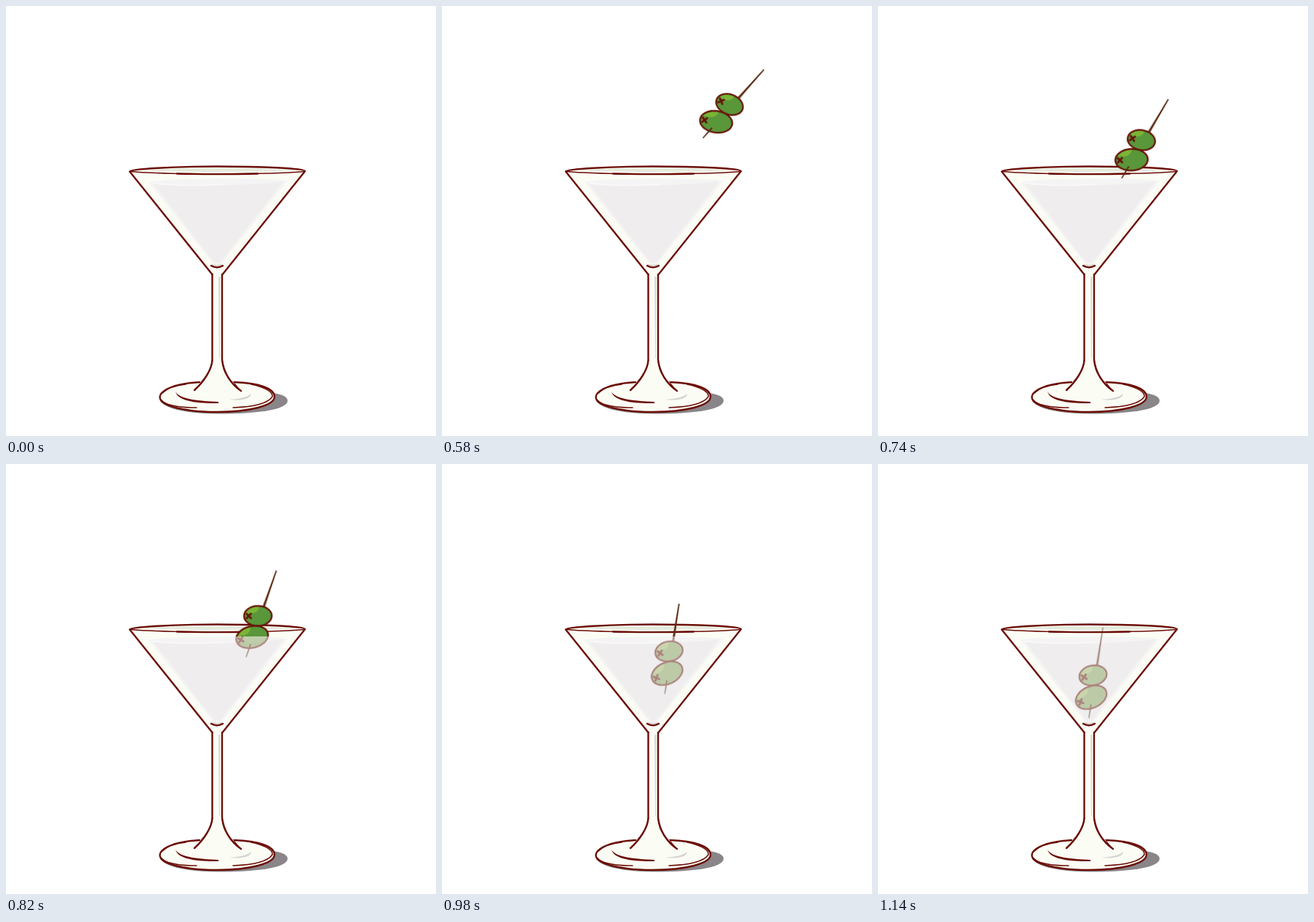
Write an HTML page that moves like this. It is 591x591 px and loops after 1.7 s.

```html
<!DOCTYPE html>
<html lang="en">
<head>
<meta charset="utf-8">
<title>Olives dropping into a martini</title>
<style>
  html, body { margin: 0; width: 100%; height: 100%; overflow: hidden; background: #fff; }
  svg { display: block; width: 100%; height: 100%; }
  .line { fill: none; stroke: #6b0d06; stroke-width: 2.4; stroke-linecap: round; stroke-linejoin: round; }
  .thin { stroke-width: 1.5; }
  .ink { fill: #6b0d06; }
  .ivory { fill: #fbfdf5; }
  .skin { fill: var(--skin); }
  .shine { fill: var(--shine); }
  .rind { fill: none; stroke: #651408; stroke-width: 2.2; }
  .stick { fill: #5c2a12; }

  .pick { animation: drop 1.7s step-end infinite; }
  .dry { --skin: #5a963a; --shine: #79b536; animation: sink 1.7s step-end infinite; }
  .wet { --skin: #89a661; --shine: #a3be6c; opacity: .5; }

  @keyframes drop {
    0%      { transform: translate(-300px, -300px); }
    29.411% { transform: translate(418.5px, 110.5px) rotate(41.7deg); }
    34.117% { transform: translate(400.5px, 134.5px) rotate(41.7deg); }
    38.823% { transform: translate(382.7px, 159px) rotate(41.7deg); }
    43.529% { transform: translate(367px, 182.5px) rotate(30.5deg); }
    48.235% { transform: translate(350.8px, 206px) rotate(19.3deg); }
    52.941% { transform: translate(332.4px, 228.3px) rotate(19.3deg); }
    57.647% { transform: translate(316px, 254px) rotate(9deg); }
    62.352% { transform: translate(307.8px, 270.5px) rotate(9deg); }
    67.058%, 100% { transform: translate(299.5px, 287px) rotate(8.8deg); }
  }
  /* Once fully under, the whole pick is seen through the glass. */
  @keyframes sink {
    0% { opacity: 1; }
    67.058%, 100% { opacity: 0; }
  }
</style>
</head>
<body>
<svg viewBox="0 0 591 591">
  <defs>
    <clipPath id="above"><rect width="591" height="237"/></clipPath>
    <path id="pimento" d="M-3-3 3 3M-3 3 3-3" stroke="#651408" stroke-width="2.8" stroke-linecap="round"/>
    <g id="olives">
      <path class="stick" d="M-.7-63H.7L1.5-5H-1.5Z"/>
      <g transform="translate(-3.4 4.1) rotate(-20)">
        <ellipse class="skin" rx="19" ry="13.6"/>
        <path class="shine" d="M-18-2C-15-10-7-13 1-13 3-9-1-5-6-4-11-3-14-5-18-2Z"/>
        <ellipse class="rind" rx="19" ry="13.6"/>
        <use href="#pimento" x="-12.5"/>
      </g>
      <g transform="translate(-1.3 34.2) rotate(-33)">
        <ellipse class="skin" rx="22.3" ry="14.8"/>
        <path class="shine" d="M-20-4C-15-12-8-14 1-14 1-10-3-6-8-5-13-4-16-7-20-4Z"/>
        <ellipse class="rind" rx="22.3" ry="14.8"/>
        <use href="#pimento" x="-16"/>
      </g>
      <path class="stick" d="M-1 44H1L.6 63H-.6Z"/>
    </g>
  </defs>

  <!-- foot -->
  <path fill="#898588" d="M211 540C214 554 252 560.500 292 560.500 345 560.500 387 555 387 542.500 387 535 372 531 350 531Z"/>
  <ellipse class="ivory" cx="290" cy="537.300" rx="79" ry="20.500"/>
  <path class="line" d="M266 517C231 519 211.500 528 211.500 538 212 550 247 558 290 558 335 558 369 549 369 537 369 526 348 518 314 517"/>
  <path class="line thin" d="M213 541C219 549 236 552 262 552M312 552C341 551 360 546 366 537 367 529 352 523 337 520M215 532C222 525 235 521 247 520"/>
  <path class="ink" d="M233 530C238 540 262 543 292 544V546C260 546 236 543 233 530Z"/>
  <path fill="#d5d5d3" d="M307 541C320 540 331 538 337 533 337 540 323 543 307 541Z"/>

  <!-- stem -->
  <path class="ivory" d="M283.500 366H297V486C299 505 310 520 323 529 305 537 277 537 259 528 272 515 283.500 500 283.500 486Z"/>
  <path fill="#d9dbd4" d="M292 372H294.500L294 484H293Z"/>
  <path class="line" d="M283.500 368V486C283 500 272 516 259 528M297 368V486C299 505 310 520 323 529"/>
  <path class="ink" d="M283.500 486C281 500 275 509 267 517 274 512 284 500 284.500 486ZM297 486C300 502 304 509 310 515 303 511 297 500 296.500 486ZM311 514 323 529 316 523Z"/>

  <!-- bowl -->
  <path class="ivory" d="M170 227C195 218 386 218 411 227L298 368H284Z"/>
  <path fill="#e5ebdd" d="M186 226C230 221.500 350 221.500 395 226 350 228.500 230 228.500 186 226Z"/>
  <path fill="#f5f4f4" d="M196 242C225 236 355 236 387 240L294 357H287Z"/>
  <path fill="#efedee" d="M203 245C240 249 340 247 381 241L294 353H287Z"/>
  <path fill="none" stroke="#fafafa" stroke-width="1.300" d="M202 243C225 248 265 247 300 245"/>
  <path fill="#d2cfcd" d="M281 354Q290 358 299 354L296 357H284Z"/>
  <path class="line" d="M282 357Q290 361.500 298 357"/>
  <path class="line" d="M283.500 369 170 227.500C171 224 230 220.500 290 220.500S410 223 411 227L297.500 369"/>
  <path class="line thin" d="M171 227.500C220 231.800 361 231.800 410 227.500"/>
  <path class="line" d="M235 230.500Q290 231.800 346 230.500"/>

  <g class="wet"><use class="pick" href="#olives"/></g>
  <g class="dry" clip-path="url(#above)"><use class="pick" href="#olives"/></g>
</svg>
</body>
</html>
```
